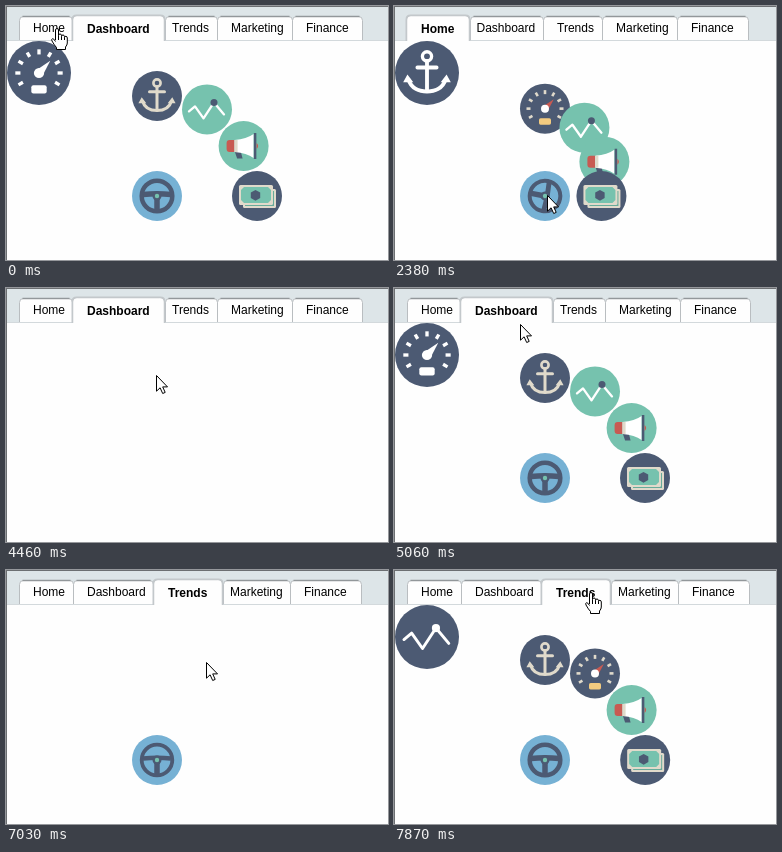
An HTML page for the animation above (8000 ms loop, 382 px wide and 254 px high).

```html
<!DOCTYPE html>
<html lang="en">
<head>
<meta charset="utf-8">
<title>Tabs with a radial menu</title>
<style>
  html, body { margin: 0; width: 100%; height: 100%; overflow: hidden; background: #fefefe; }
  svg { display: block; width: 100vw; height: 100vh; }
  text { font: 12px "Liberation Sans", Arial, sans-serif; fill: #000; }
  .bold { font-weight: bold; }
</style>
</head>
<body>
<svg id="stage" viewBox="0 0 382 254">
  <defs>
    <g id="anchor" fill="none" stroke="currentColor" stroke-width="3">
      <circle cy="-13" r="3.6" stroke-width="2.6"/>
      <path d="M0-9.5V14M-7.5-4.3H7.5" stroke-linecap="round"/>
      <path d="M-14.5 5C-12.500 12-6 14.500 0 14.500S12.500 12 14.500 5"/>
      <path d="M-15.300 1.200L-18.600 7.300-10.700 7.300ZM15.300 1.200L18.600 7.300 10.700 7.300Z" fill="currentColor" stroke="none"/>
    </g>
    <g id="dial" fill="none" stroke="currentColor" stroke-width="2.6"></g>
    <path id="needle" d="M-2.500-2L8.800-9.500 2.500 2.500Z"/>
    <rect id="plate" x="-6" y="9.500" width="12" height="6.500" rx="1.600"/>
    <path id="graph" d="M-18 2L-12-3-3.500 9 7-7 17 5" fill="none" stroke="#fff" stroke-width="2.300" stroke-linecap="round" stroke-linejoin="round"/>

    <g id="homeIcon"><circle r="25" fill="#4c5a73"/><use href="#anchor" color="#e0dacb"/></g>
    <g id="homeBig"><circle r="25" fill="#4c5a73"/><use href="#anchor" color="#fff"/></g>

    <g id="dashIcon">
      <circle r="25" fill="#4c5a73"/><use href="#dial" color="#e0dacb"/>
      <use href="#needle" fill="#c85a52"/><circle r="4" fill="#fff"/><use href="#plate" fill="#f3cb80"/>
    </g>
    <g id="dashBig">
      <circle r="25" fill="#4c5a73"/><use href="#dial" color="#fff"/>
      <g fill="#fff"><use href="#needle"/><circle r="4"/><use href="#plate"/></g>
    </g>

    <g id="trendIcon"><circle r="25" fill="#76c2ae"/><use href="#graph"/><circle cx="7" cy="-7" r="3.500" fill="#4c5a73"/></g>
    <g id="trendBig"><circle r="25" fill="#4c5a73"/><use href="#graph"/><circle cx="7" cy="-7" r="3.200" fill="#fff"/></g>

    <g id="marketIcon">
      <circle r="25" fill="#76c2ae"/>
      <path d="M-9 5H-3L-1 12.500H-6.500Z" fill="#4c5a73"/>
      <path d="M-9-6H-14Q-17-6-17-3V3Q-17 6-14 6H-9Z" fill="#c85a52"/>
      <path d="M-9-6Q3-7 10-12V12Q3 7-9 6Z" fill="#fff"/>
      <path d="M-9-6H-6V6H-9Z" fill="#e0dacb"/>
      <path d="M11.500-13V13" stroke="#4c5a73" stroke-width="2.500"/>
      <path d="M13-3Q16 0 13 3Z" fill="#c85a52"/>
    </g>

    <g id="moneyIcon">
      <circle r="25" fill="#4c5a73"/>
      <rect x="-14" y="-7" width="33" height="19" rx="1.500" fill="#e0dacb"/>
      <rect x="-12" y="-5" width="29" height="15" fill="#67ab9a"/>
      <rect x="-18" y="-11" width="34" height="20" rx="1.500" fill="#e0dacb"/>
      <path d="M-13-9H11L14-6V4L11 7H-13L-16 4V-6Z" fill="#76c2ae"/>
      <path d="M-1.500-6L3.200-3.500V2L-1.500 4.700-6.200 2V-3.500Z" fill="#4c5a73"/>
    </g>
  </defs>

  <rect width="382" height="254" fill="#fefefe"/>
  <rect width="382" height="35" fill="#dde5e8"/>
  <path d="M0 34.500H382" stroke="#d3d9dc"/>
  <g id="tabs"></g>
  <path d="M0 .5H382M.5 0V254" stroke="#6c6f72"/>
  <g id="big" transform="translate(33 67) scale(1.28)">
    <use href="#homeBig"/><use href="#dashBig"/><use href="#trendBig"/>
  </g>
  <g id="items"></g>
  <g id="wheel">
    <circle r="25" fill="#76b1d4"/>
    <g id="spin" fill="none" stroke="#4c5a73">
      <circle id="rim" r="15.300"/>
      <path id="bar" d="M-14-1.500Q0-3 14-1.500"/>
      <path d="M0 0V14" stroke-width="5.500"/>
      <circle r="4.500" fill="#4c5a73" stroke="none"/>
      <circle r="2.200" fill="#76c2ae" stroke="none"/>
    </g>
  </g>
  <g id="cursor" stroke="#000" fill="#fff" stroke-linejoin="round">
    <path id="arrow" d="M.5.5V16.200L4.100 12.800 6.700 18.500 9.200 17.400 6.700 11.900H11.500Z"/>
    <path id="hand" d="M-1.500 12V2Q-1.500.5 0 .5T1.500 2V7.500Q1.500 6 3 6T4.500 7.500V8.200Q4.700 7 6 7T7.500 8.500V9.200Q7.800 8.200 9 8.300T10.300 10V15Q10.300 17 8.500 19V21.500H-.5V19.500Q-2.500 17.500-5 13Q-5.800 11.200-4.600 10.700T-1.500 13.500M1.500 7.500V12M4.500 8.200V12M7.500 9.200V12"/>
  </g>
</svg>
<script>
const LOOP = 8000, CX = 151, CY = 190, REACH = 100;
const $ = id => document.getElementById(id);
const show = (el, on) => el.setAttribute("visibility", on ? "visible" : "hidden");
const NS = "http://www.w3.org/2000/svg";
const add = (parent, tag, attrs) => {
  const el = document.createElementNS(NS, tag);
  for (const k in attrs) el.setAttribute(k, attrs[k]);
  return parent.appendChild(el);
};

const names = ["Home", "Dashboard", "Trends", "Marketing", "Finance"];
const layouts = [
  { edges: [12, 76, 149, 208, 283, 354], text: [27, 82.5, 163, 222, 297] },
  { edges: [13, 66, 159, 211, 286, 356], text: [27, 81, 166, 225, 300] },
  { edges: [13, 67, 147, 217, 284, 355], text: [27, 81, 162, 224, 298] }
];

// Each visit: tab, time it opens, wheel and badge appear, menu springs out.
const visits = [
  { tab: 1, from: 0, wheel: 0, badge: 0, open: -600 },
  { tab: 0, from: 620, wheel: 770, badge: 930, open: 2240 },
  { tab: 1, from: 4460, wheel: 4610, badge: 4610, open: 4490 },
  { tab: 2, from: 7030, wheel: 7030, badge: 7180, open: 7320 }
];
const menus = [
  ["dashIcon", "trendIcon", "marketIcon", "moneyIcon"],
  ["homeIcon", "trendIcon", "marketIcon", "moneyIcon"],
  ["homeIcon", "dashIcon", "marketIcon", "moneyIcon"]
];

// Pointer stops: time, x, y
const path = [
  [0, 51, 22], [930, 51, 22], [1110, 43, 42], [1530, 133, 176], [1680, 153, 189],
  [3149, 153, 189], [3150, 150, 87], [4610, 150, 87], [4760, 146, 76], [5060, 126, 36],
  [5210, 112, 24], [5360, 107, 22], [5510, 112, 28], [5960, 183, 115], [6110, 190, 120],
  [6440, 200, 92], [7460, 200, 92], [7600, 203, 62], [7740, 200, 36], [7870, 197, 22], [8000, 197, 22]
];

// The screen refreshes in bursts; it stays still between them.
const bursts = [
  [620, 930, 3], [1110, 1110, 1], [1230, 1680, 4], [2380, 2830, 4], [3150, 3150, 1],
  [4460, 5360, 7], [5510, 6440, 7], [7030, 7180, 2], [7460, 7870, 4]
];
const ticks = [0];
for (const [a, b, n] of bursts)
  for (let i = 0; i < n; i++) ticks.push(n > 1 ? Math.floor(a + (b - a) * i / (n - 1)) : a);

function tabShape(a, b, top, bottom) {
  return `M${a} ${bottom}V${top + 4}Q${a} ${top} ${a + 4} ${top}H${b - 4}Q${b} ${top} ${b} ${top + 4}V${bottom}`;
}

const tabSets = layouts.map(({ edges, text }, active) => {
  const g = add($("tabs"), "g", {});
  const order = [0, 1, 2, 3, 4].filter(i => i !== active).concat(active);
  for (const i of order) {
    const a = edges[i] + .5, b = edges[i + 1] + .5;
    if (i === active) {
      add(g, "path", { d: tabShape(a, b - 1, 9.5, 35), fill: "#fefefe", stroke: "#c3c8cb", "stroke-width": 2 });
      add(g, "path", { d: tabShape(a + 1, b - 2, 10.5, 36), fill: "#fefefe" });
    } else {
      add(g, "path", { d: tabShape(a, b, 10.5, 34), fill: "#fefefe", stroke: "#b9bdc0" });
      add(g, "path", { d: `M${a + 3} 10.500H${b - 3}`, stroke: "#92979a", "stroke-width": 1.4 });
    }
    const label = add(g, "text", { x: text[i], y: i === active ? 27 : 26 });
    label.textContent = names[i];
    if (i === active) label.setAttribute("class", "bold");
  }
  return g;
});

for (let i = 0; i < 9; i++)
  add($("dial"), "path", { d: "M0-14.500V-18.500", transform: `rotate(${-120 + i * 30})` });

const items = menus[0].map(() => add($("items"), "use", {}));
const badges = [...$("big").children];

const clamp = v => Math.max(0, Math.min(1, v));
const backOut = p => 1 + 2.70158 * (p - 1) ** 3 + 1.70158 * (p - 1) ** 2;

function pointer(t) {
  let i = 0;
  while (i < path.length - 2 && path[i + 1][0] <= t) i++;
  const [t0, x0, y0] = path[i], [t1, x1, y1] = path[i + 1];
  const p = clamp((t - t0) / (t1 - t0));
  return [x0 + (x1 - x0) * p, y0 + (y1 - y0) * p];
}

function draw(ms) {
  const now = ms % LOOP;
  const t = ticks.filter(k => k <= now).pop();
  const v = visits.filter(k => k.from <= t).pop();

  tabSets.forEach((g, i) => show(g, i === v.tab));
  badges.forEach((b, i) => show(b, i === v.tab && t >= v.badge));
  show($("wheel"), t >= v.wheel);

  items.forEach((el, i) => {
    const p = clamp((t - v.open - i * 22) / 500);
    const r = REACH * backOut(p), angle = (90 - 30 * i) * Math.PI / 180;
    show(el, p > 0 && t >= v.wheel);
    el.setAttribute("href", "#" + menus[v.tab][i]);
    el.setAttribute("transform", `translate(${CX + r * Math.cos(angle)} ${CY - r * Math.sin(angle)})`);
  });

  const turn = clamp((t - v.open) / 500);
  $("wheel").setAttribute("transform", `translate(${CX} ${CY})`);
  $("spin").setAttribute("transform", `rotate(${360 * turn})`);
  $("rim").setAttribute("stroke-width", 3.8 + turn * .7);
  $("bar").setAttribute("stroke-width", 4.6 + turn * .9);

  const [x, y] = pointer(t);
  $("cursor").setAttribute("transform", `translate(${Math.round(x)} ${Math.round(y)})`);
  show($("hand"), y < 34);
  show($("arrow"), y >= 34);
}

function loop() {
  draw(performance.now());
  requestAnimationFrame(loop);
}
loop();
</script>
</body>
</html>
```
